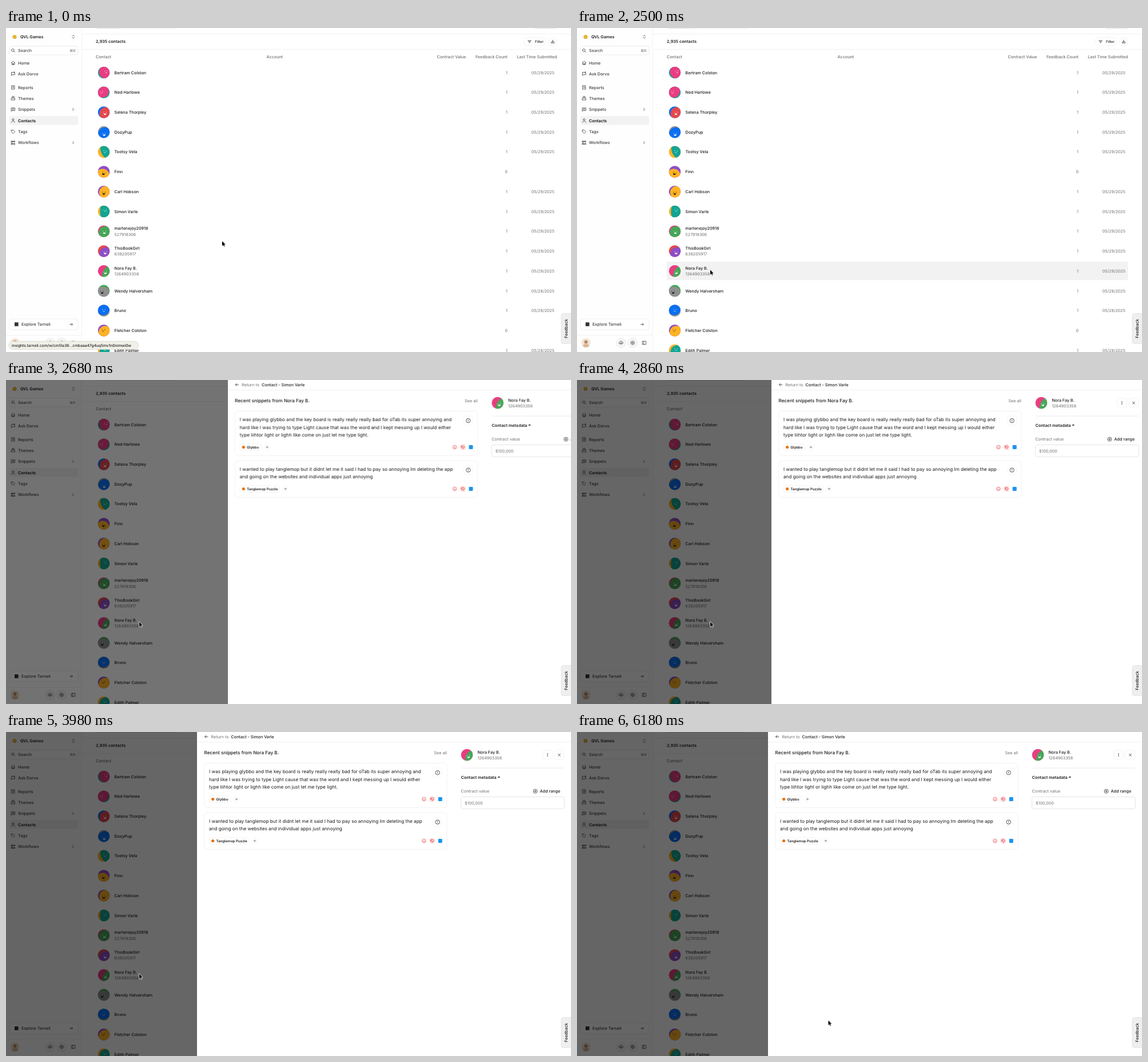
Recreate the animation shown at these times as an HTML page. Size 988 by 567 pixels, loop 6420 ms.

```html
<!DOCTYPE html>
<html lang="en">
<head>
<meta charset="utf-8">
<title>Contacts</title>
<style>
  html, body { margin: 0; width: 100%; height: 100%; overflow: hidden; background: #fff; }
  svg { display: block; width: 100vw; height: 100vh; }
  text { font-family: Inter, "Noto Sans", sans-serif; text-rendering: geometricPrecision; white-space: pre; }
</style>
</head>
<body>
<svg id="stage" viewBox="0 0 988 567" xmlns="http://www.w3.org/2000/svg"></svg>
<script>
const INK = '#1c1c1c', GREY = '#6f6f6f', LINE = '#ebebeb';
const LOOP = 6420;

// Text is placed by its vertical centre, using the cap height of the font.
function text(x, y, str, { size = 7.18, weight = 400, fill = INK, anchor = 'start' } = {}) {
  return `<text x="${x}" y="${y + size * 0.364}" font-size="${size}" font-weight="${weight}" fill="${fill}" text-anchor="${anchor}">${str}</text>`;
}
const rect = (x, y, w, h, r = 0, fill = 'none', stroke = 'none') =>
  `<rect x="${x}" y="${y}" width="${w}" height="${h}" rx="${r}" fill="${fill}" stroke="${stroke}" stroke-width=".7"/>`;
const disc = (x, y, r, fill = 'none', stroke = 'none') =>
  `<circle cx="${x}" cy="${y}" r="${r}" fill="${fill}" stroke="${stroke}" stroke-width=".75"/>`;
const line = (x, y, w, color = LINE) => rect(x, y, w, 0.7, 0, color);
const icon = (x, y, d, color = '#333', fill = 'none') =>
  `<path transform="translate(${x} ${y})" d="${d}" fill="${fill}" stroke="${color}" stroke-width=".75" stroke-linecap="round" stroke-linejoin="round"/>`;
const group = (id, body, attrs = '') => `<g id="${id}" ${attrs}>${body}</g>`;

const ICONS = {
  search: 'M-2.8 -.5a2.3 2.3 0 1 1 4.6 0a2.3 2.3 0 1 1 -4.6 0M1.2 1.2 3 3',
  home: 'M-3.2 -.2 0 -3 3.2 -.2M-2.4 -.8V3H2.4V-.8M-.7 3V1H.7V3',
  chat: 'M.6 -2.5H-3V3.2L-1.5 1.8H3V-.6M2 -3.4V-1.2M.9 -2.3H3.1',
  report: 'M-2.5 -3.1H2.5V3.1H-2.5ZM-1 -1.2H1M-1 .6H1',
  theme: 'M-1.8 -3.2H1.8M-2.5 -1.7H2.5M-3 0H3V3H-3Z',
  snippet: 'M-3 -2.7H3V2H-1.6L-3 3.2ZM-1.3 -1H1.3M-1.3 .4H.5',
  person: 'M-1.6 -1.6a1.6 1.6 0 1 1 3.2 0a1.6 1.6 0 1 1 -3.2 0M-2.8 3.2C-2.8 .2 2.8 .2 2.8 3.2',
  tag: 'M-3 -3H0L3.1 .1 .1 3.1 -3 0ZM-1.5 -1.5h.1',
  flow: 'M-3 -3H-1.2V-1.2H-3ZM1.2 1.2H3V3H1.2ZM-3 1.2H-1.2V3H-3ZM1.2 -3H3V-1.2H1.2ZM-1.2 -2.1H1.2M-1.2 2.1H1.2M-2.1 -1.2V1.2',
  right: 'M-1 -1.9 1 0 -1 1.9',
  updown: 'M-1.7 -1.1 0 -2.8 1.7 -1.1M-1.7 1.1 0 2.8 1.7 1.1',
  arrow: 'M-2.4 0H2.4M.4 -2 2.4 0 .4 2',
  back: 'M2.6 0H-2.6M-.4 -2.2 -2.6 0 -.4 2.2',
  filter: 'M-2.8 -1.8H2.8M-1.8 0H1.8M-.7 1.8H.7',
  download: 'M0 -2.6V.8M-1.5 -.6 0 .9 1.5 -.6M-2.6 .9V2.4H2.6V.9',
  cloud: 'M-1.6 1.6H-2.2C-4.4 1.2 -3.6 -1.4 -2 -1.2C-1.4 -4 2.2 -3.4 2.2 -1C4.2 -.9 3.8 1.6 2 1.6H1.6M0 3V-.2M-1.2 .9 0 -.3 1.2 .9',
  gear: 'M-1.1 0a1.1 1.1 0 1 1 2.2 0a1.1 1.1 0 1 1 -2.2 0M-1.3 -2.9H1.3L2.9 -1.3V1.3L1.3 2.9H-1.3L-2.9 1.3V-1.3Z',
  sidebar: 'M-3 -2.8H3V2.8H-3ZM-1 -2.8V2.8',
  plus: 'M-2 0H2M0 -2V2',
  cross: 'M-1.9 -1.9 1.9 1.9M1.9 -1.9 -1.9 1.9',
  alert: 'M0 -1.8V.2M0 1.7v.05',
  smile: 'M-1.2 -.8v.1M1.2 -.8v.1M-1.5 .9Q0 2.4 1.5 .9',
  thumb: 'M-1.2 -2.2H2C2.7 -1.2 2.9 0 2.8 .7H.7L1 2.6C.2 3 -.2 2.6 -1.2 .6ZM-1.2 -2.2H-2.6V.6H-1.2'
};

const PINK = '#e93d82', TEAL = '#12a594', RED = '#e5484d', BLUE = '#0a6ff2', GOLD = '#ffb224',
      PURPLE = '#8e4ec6', GREEN = '#46a758', STONE = '#8f8f8f';

// back, front, front offset x/y, front radius, face offset x/y, face tilt, open mouth, face colour
const avatars = [
  [TEAL, PINK, 2.5, -1, 11, 4, -2, -15, 0, '#fff'],
  [TEAL, PINK, -2, -2, 11, -4, -1, -12, 0, '#fff'],
  [BLUE, RED, 4, 2.5, 11.5, 2, 1, 0, 1, '#fff'],
  [STONE, BLUE, 2, 3.5, 12, .5, 3, -5, 1, '#fff'],
  [GOLD, TEAL, 14, -6, 20, 2, -1, 10, 0, '#fff'],
  [PURPLE, GOLD, -2, 7, 12, 0, 2, 20, 1, '#111'],
  [PURPLE, GOLD, 3, 1.5, 11, 0, 2, 0, 1, '#111'],
  [GOLD, TEAL, 23.3, 0, 30, 2.5, -2.5, -10, 0, '#fff'],
  [PINK, GREEN, 2, 2, 11, 1, 1, 0, 1, '#fff'],
  [RED, PURPLE, 4, 5, 12, 2.5, 2, 8, 1, '#fff'],
  [PINK, GREEN, 17, 9, 20, 2.5, 2, -12, 1, '#fff'],
  [GREEN, STONE, -2, 4.5, 12, -3, 1.5, -5, 1, '#111'],
  [STONE, BLUE, -1, -3, 11, 0, -1, 0, 0, '#fff'],
  [PURPLE, GOLD, 2.5, 3.5, 11.5, -1, -1, 5, 0, '#111'],
  [GOLD, TEAL, 4.5, 3, 12, 2, -2, 8, 0, '#fff']
];

function avatar(x, y, [back, front, dx, dy, r, fx, fy, tilt, open, face]) {
  const mouth = open
    ? `<path d="M-2.4 1.2H2.4A2.4 2.3 0 0 1 -2.4 1.2Z" fill="${face}"/>`
    : `<path d="M-1.5 1.9Q0 3 1.5 1.9" fill="none" stroke="${face}" stroke-width=".6" stroke-linecap="round"/>`;
  return `<g transform="translate(${x} ${y})" clip-path="url(#round)">
    ${disc(0, 0, 11, back)}${disc(dx, dy, r, front)}
    <g transform="translate(${fx} ${fy}) rotate(${tilt})">${disc(-2.2, -.9, .55, face)}${disc(2.2, -.9, .55, face)}${mouth}</g></g>`;
}

function sidebar() {
  const items = [
    ['Home', 61, 'home'], ['Ask Dorvo', 80, 'chat'], ['Reports', 104, 'report'], ['Themes', 123, 'theme'],
    ['Snippets', 142.5, 'snippet', 1], ['Contacts', 162, 'person'], ['Tags', 181.5, 'tag'], ['Workflows', 200.7, 'flow', 1]
  ];
  let out = rect(0, 0, 132, 567, 0, '#fefefe') + rect(132, 0, .7, 567, 0, LINE)
    + disc(15, 15.5, 3.6, '#e2b53c') + text(25, 15.5, 'QVL Games', { weight: 600 }) + icon(117.7, 15.5, ICONS.updown)
    + rect(6, 31.7, 120, 15.3, 4, '#fff', '#e2e2e2') + icon(12.5, 39.3, ICONS.search)
    + text(21, 39.3, 'Search', { weight: 500, fill: '#444' })
    + text(122, 39.3, '⌘K', { size: 6.6, fill: GREY, anchor: 'end' })
    + rect(6, 154, 120, 15.5, 3.5, '#f2f2f2');
  for (const [label, y, name, more] of items) {
    const on = label === 'Contacts';
    out += icon(12.5, y, ICONS[name]) + text(21, y, label, { weight: on ? 600 : 500, fill: on ? '#111' : '#3a3a3a' });
    if (more) out += icon(117.5, y, ICONS.right);
  }
  return out + rect(6, 509, 120, 19, 4, '#fff', '#e6e6e6') + rect(15, 515.2, 6.6, 6.6, 0, '#333')
    + text(27, 518.6, 'Explore Tarneli', { weight: 500, fill: '#3a3a3a' }) + icon(114, 518.6, ICONS.arrow)
    + line(0, 537, 132)
    + `<g transform="translate(15.7 551)" clip-path="url(#small)">${disc(0, 0, 9, '#f3e3d2')}${disc(0, -1.5, 3, '#b98a68')}${disc(0, 7, 5.5, '#d9b79a')}</g>`
    + disc(77, 551, 8.3, '#f5f5f5', '#e6e6e6') + icon(77, 551, ICONS.cloud, '#222')
    + disc(97.3, 551, 8.3, '#f5f5f5', '#e6e6e6') + icon(97.3, 551, ICONS.gear, '#222')
    + icon(117.7, 551, ICONS.sidebar);
}

const rows = [
  ['Bertram Colston', 1, 29], ['Ned Harlowe', 1, 29], ['Selena Thorpley', 1, 29], ['DozyPup', 1, 29], ['Tootsy Vela', 1, 29],
  ['Finn', 0], ['Carl Hobson', 1, 29], ['Simon Varle', 1, 29], ['marlenejoy20918', 1, 29, '527918306'],
  ['ThisBookGirl', 1, 29, '638205917'], ['Nora Fay B.', 1, 29, '1264903358'], ['Wendy Halversham', 1, 28],
  ['Bruno', 1, 28], ['Fletcher Colston', 0], ['Edith Palmer', 1, 28]
];

function table() {
  const head = { fill: GREY, weight: 450 }, end = { ...head, anchor: 'end' };
  let out = rect(157, -9, 143, 10, 3, '#ededed') + rect(158.5, -9, 43.5, 9.4, 2, '#dcdcdc') + rect(924, -9, 39.5, 10, 3, '#f1f1f1', '#e6e6e6')
    + line(132, 10.3, 856) + line(132, 37, 856)
    + text(157, 23.6, '2,935 contacts', { weight: 600 })
    + rect(905.5, 16.5, 38.5, 14.5, 7, '#fff', LINE) + icon(915.5, 23.8, ICONS.filter, INK)
    + text(925, 23.8, 'Filter', { size: 6.15, weight: 500 })
    + rect(948.7, 16.5, 14.5, 14.5, 7, '#fff', LINE) + icon(956, 23.8, ICONS.download, INK)
    + text(157, 50.6, 'Contact', head) + text(455.5, 50.6, 'Account', head)
    + text(804.3, 50.6, 'Contract Value', end) + text(877, 50.6, 'Feedback Count', end)
    + text(963.5, 50.6, 'Last Time Submitted', end)
    + group('pressed', rect(157, 409, 806.5, 32.3, 1, '#f2f2f2'), 'opacity="0"');
  rows.forEach(([name, count, day, code], i) => {
    const y = 78 + i * 34.72;
    out += avatar(171, y, avatars[i]) + text(189.5, code ? y - 5 : y, name, { weight: 500 });
    if (code) out += text(189.5, y + 5.3, code, { fill: GREY });
    out += text(877, y, count, { fill: GREY, anchor: 'end' });
    if (day) out += text(959, y, `05/${day}/2025`, { fill: GREY, anchor: 'end' });
  });
  return out;
}

function card(y, h, lines, tag, pillW) {
  const foot = y + h - 14.7;
  let out = rect(346.7, y, 424.3, h, 5, '#fff', '#ececec');
  lines.forEach((str, i) => out += text(355, y + 14.8 + i * 13.35, str, { size: 8.2 }));
  return out + rect(746.5, y + 8.3, 16.5, 16.5, 5, '#fff', '#f1f1f1')
    + disc(754.7, y + 16.6, 3.7, 'none', INK) + icon(754.7, y + 16.6, ICONS.alert, INK)
    + rect(355, foot - 6, pillW, 12, 4, '#fff', '#f1f1f1') + disc(361.7, foot, 2.6, '#e5730f')
    + text(367.4, foot, tag, { size: 6.15, weight: 600 })
    + disc(355 + pillW + 10.5, foot, 5.6, '#fff', '#f4f4f4') + icon(355 + pillW + 10.5, foot, ICONS.plus, '#777')
    + disc(731, foot, 3.3, 'none', RED) + icon(731, foot, ICONS.smile, RED)
    + disc(745.2, foot, 5.4, '#fde0e0') + icon(745.2, foot, ICONS.thumb, RED)
    + rect(755.8, foot - 3.5, 7, 7, 1.3, '#1c93ee');
}

function panel() {
  const dots = [-2.3, 0, 2.3].map(d => disc(947, 40 + d, .7, INK)).join('');
  return rect(334, 0, 660, 567, 0, '#fff')
    + icon(350.3, 8.2, ICONS.back, INK) + text(358.6, 8.2, 'Return to', { fill: GREY })
    + text(393.6, 8.2, 'Contact - Simon Varle', { weight: 500 }) + line(334, 17, 654)
    + text(346.6, 36.2, 'Recent snippets from Nora Fay B.', { size: 8.2, weight: 500 })
    + text(771, 36.2, 'See all', { fill: GREY, anchor: 'end' })
    + card(54.5, 77.7, [
        'I was playing glybbo and the key board is really really really bad for oTab its super annoying and',
        'hard like I was trying to type Light cause that was the word and I kept messing up I would either',
        'type liihtor light or lighh like come on just let me type light.'], 'Glybbo', 37.5)
    + card(141, 64.2, [
        'I wanted to play tanglemop but it didnt let me it said I had to pay so annoying Im deleting the app',
        'and going on the websites and individual apps just annoying'], 'Tanglemop Puzzle', 69.5)
    + avatar(806, 40, avatars[10]) + text(824.4, 35, 'Nora Fay B.', { weight: 500 })
    + text(824.4, 45.2, '1264903358', { fill: GREY })
    + rect(938.8, 31.8, 16.5, 16.5, 5, '#fff', LINE) + dots
    + rect(959.3, 31.8, 16.5, 16.5, 5, '#fff', LINE) + icon(967.5, 40.1, ICONS.cross, INK)
    + line(796, 62.7, 180.5, '#e4e4e4')
    + text(795.8, 79, 'Contact metadata', { weight: 600 }) + icon(862, 79, 'M-1.5 -.6H1.5L0 .9Z', INK, INK)
    + text(795.6, 103.6, 'Contract value', { fill: GREY })
    + disc(925.5, 103.6, 3.4, 'none', INK) + icon(925.5, 103.6, 'M-1.5 0H1.5M0 -1.5V1.5', INK)
    + text(933.6, 103.6, 'Add range', { weight: 500 })
    + rect(795.6, 113.5, 180.7, 20.7, 3, '#fff', '#dadada') + text(802, 124, '$100,000', { fill: '#777' });
}

const stage = document.getElementById('stage');
stage.innerHTML = `<defs><clipPath id="round"><circle r="10.3"/></clipPath><clipPath id="small"><circle r="8"/></clipPath></defs>`
  + table() + sidebar()
  + group('status', rect(4.8, 548.2, 227, 14.2, 7, '#f1f0e8', '#d5d3c6')
      + text(10, 555.2, 'insights.tarneli.com/w/cm5la36...cmbaaa47g4uq5mv1n0nimwi0w', { size: 6.65, weight: 450 }))
  + group('shade', rect(0, 0, 988, 567, 0, '#000'), 'opacity="0"')
  + group('panel', panel())
  + rect(971, 499.6, 24, 53, 4, '#efefef', '#dcdcdc')
  + `<g transform="translate(979.7 526) rotate(-90)">${text(0, 0, 'Feedback', { weight: 500, anchor: 'middle' })}</g>`
  + group('pointer', `<path d="M0 0V8.4L1.9 6.6 3.3 9.6 4.6 9 3.2 6.1H5.8Z" fill="#000" stroke="#fff" stroke-width="1.3" stroke-linejoin="round" paint-order="stroke"/>`);

// Each step is [ms, properties, easing towards the next step].
function play(id, steps) {
  const frames = steps.map(([ms, props, easing = 'linear']) => ({ ...props, offset: ms / LOOP, easing }));
  document.getElementById(id).animate(frames, { duration: LOOP, iterations: Infinity });
}
const at = (x, y) => ({ transform: `translate(${x}px, ${y}px)` });
const alpha = opacity => ({ opacity });
const GLIDE = 'cubic-bezier(0, 1, .14, 1)', EASE = 'ease-in-out';
const OPEN = 2543, OPENED = 3120;

play('status', [[0, alpha(1)], [640, alpha(1)], [840, alpha(0)], [LOOP, alpha(0)]]);
play('pressed', [[0, alpha(0)], [2500, alpha(0)], [2500, alpha(1)], [2600, alpha(1)], [2600, alpha(0)], [LOOP, alpha(0)]]);
play('shade', [[0, alpha(0)], [OPEN, alpha(0), GLIDE], [OPENED, alpha(.6)], [LOOP, alpha(.6)]]);
play('panel', [[0, at(660, 0)], [OPEN, at(660, 0)], [OPEN, at(654, 0), GLIDE], [OPENED, at(0, 0)], [LOOP, at(0, 0)]]);
play('pointer', [
  [0, at(378, 373)], [400, at(378, 373), EASE], [1040, at(232.7, 405.3)],
  [1600, at(232.7, 405.3)], [1620, at(232.7, 406)], [1780, at(232.7, 406), EASE], [2020, at(233, 423.3)],
  [4820, at(233, 423.3), EASE], [5280, at(395, 516)], [5540, at(395, 516), EASE],
  [6180, at(439.5, 504.7)], [LOOP, at(439.5, 504.7)]
]);
</script>
</body>
</html>
```
